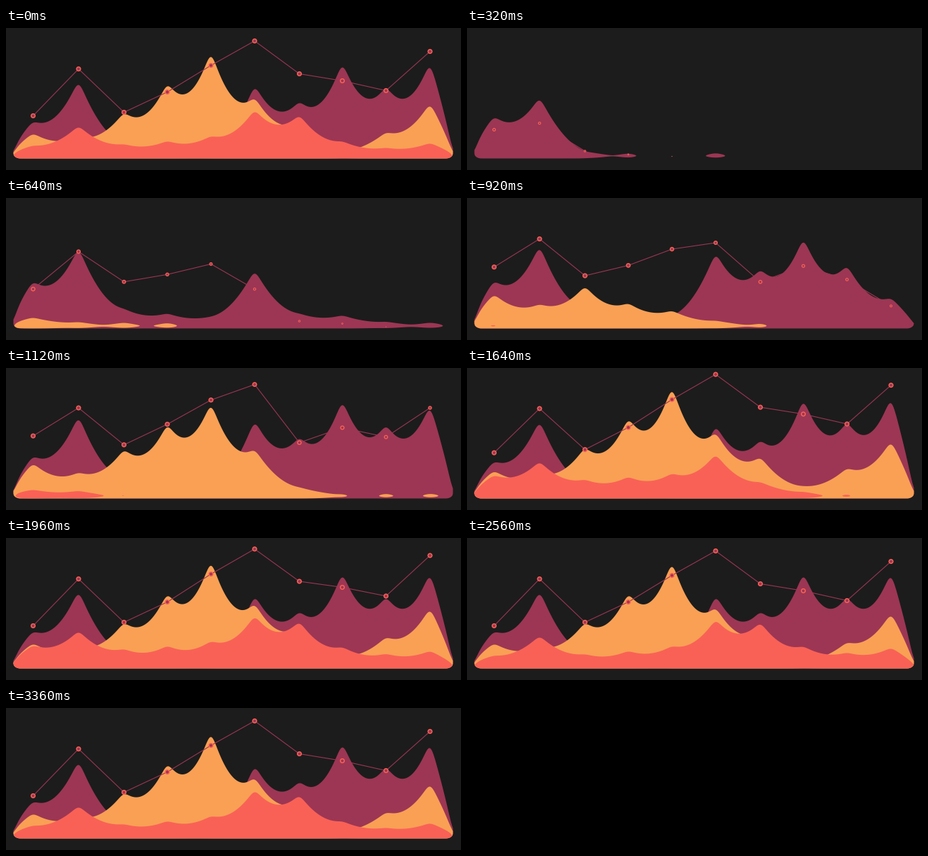
Animation, 646 px wide and 203 px high, one loop 4360 ms. Source, as a matplotlib script:

```python
import numpy as np
import matplotlib.pyplot as plt
from matplotlib.animation import FuncAnimation
from matplotlib.collections import LineCollection
from matplotlib.patches import Circle, Polygon

W, H, DPI = 646, 203, 100
STEP, LOOP = 40, 4360
STAGGER, WAVE = 80, 480
FLOOR = 186.5
LEFT, RIGHT = 10.5, 634.5
BASE, THIN = 7, 7.6
BG, PLUM, AMBER, CORAL = "#1c1c1c", "#9c3654", "#f9a055", "#f96156"
PX = 72 / DPI

KX = np.array([38.5, 103, 167.5, 229, 291, 353, 416.5, 477.5, 539.5, 602])
IDX = np.arange(len(KX))
LAYERS = [
    (PLUM, np.array([51, 105, 22, 15, 12, 99, 79, 130, 99, 129])),
    (AMBER, np.array([34, 30, 63, 103, 145, 84, 50, 11, 36, 74])),
    (CORAL, np.array([18, 44, 20, 24, 31, 66, 59, 24, 15, 21])),
]
# heights of the line chart after each of its three waves
LINE_A = np.array([50, 112, 70, 85, 112, 125, 70, 103, 92, 143])
LINE_B = np.array([90, 130, 77, 108, 146, 179, 131, 121, 107, 163])
LINE_C = np.array([61, 128, 66, 95, 133, 168, 121, 111, 97, 153])

X = np.arange(LEFT, RIGHT + 0.25, 0.5)
KERNEL = np.exp(-0.5 * (np.arange(-24, 25) / 8) ** 2)
KERNEL /= KERNEL.sum()


def rise(t):
    return np.interp(
        t,
        [-120, -80, 0, 40, 120, 160, 200, 220, 240, 280, 360, 440, 520, 600, 680, 760],
        [0, .015, .03, .05, .12, .18, .27, .45, .72, .8, .89, .945, .963, .98, .99, 1])


def settle(t):
    return np.interp(t, [960, 1040, 1080, 1120, 1160, 1210],
                     [1, .95, .75, .5, .25, 0])


def line_settle(t):
    return np.interp(t, [1160, 1240, 1320, 1400, 1480, 1560, 1640, 1720],
                     [1, .85, .65, .5, .35, .25, .15, 0])


def dip_curve(v):
    """Sagging arcs between the peaks, falling off to both ends."""
    k = np.clip(np.searchsorted(KX, X) - 1, 0, len(KX) - 2)
    u = (X - KX[k]) / (KX[k + 1] - KX[k])
    a, b = v[k], v[k + 1]
    c = 0.42 * (a + b) / 2 + 2
    h = (1 - u) ** 2 * a + 2 * u * (1 - u) * c + u ** 2 * b
    lo, hi = X < KX[0], X > KX[-1]
    h[lo] = 6 + (v[0] - 6) * ((X[lo] - LEFT) / (KX[0] - LEFT)) ** 0.65
    h[hi] = 6 + (v[-1] - 6) * ((RIGHT - X[hi]) / (RIGHT - KX[-1])) ** 0.85
    return h


def smooth(h):
    return np.convolve(np.pad(h, 24, mode="edge"), KERNEL, mode="valid")


def profile(v):
    """Rounded curve whose peaks still reach the heights v."""
    tips = v.astype(float)
    for _ in range(3):
        h = smooth(dip_curve(tips))
        tips = tips + v - np.interp(KX, X, h)
    return smooth(dip_curve(tips))


def outline(v):
    h = np.maximum(profile(v), 0.1)
    half = h / 2 * np.sqrt(np.clip(1 - (THIN / h) ** 6, 0, 1))
    mid = FLOOR - h / 2
    edge = np.clip(1 - np.minimum(X - LEFT, RIGHT - X) / 10, 0, 1)
    corner = FLOOR - 7 * (1 - np.sqrt(1 - edge ** 2))
    top = mid - half
    bottom = np.maximum(np.minimum(mid + half, corner), top)
    return np.column_stack([np.r_[X, X[::-1]], np.r_[top, bottom[::-1]]])


def layer_heights(v, t):
    f = rise(t)
    base = np.full(len(v), float(BASE))
    base[0] += 7 * min(1, 1.5 * f[0])
    return v * f + base * settle(t)


# the tiny margin keeps the pixel size from rounding down
fig = plt.figure(figsize=((W + 0.01) / DPI, (H + 0.01) / DPI), dpi=DPI, facecolor=BG)
ax = fig.add_axes([0, 0, 1, 1])
ax.set_xlim(0, W)
ax.set_ylim(H, 0)
ax.axis("off")

areas = []
for z, (color, _) in enumerate(LAYERS):
    area = Polygon([(0, 0), (0, 0), (0, 0)], closed=True, fc=color, lw=0, zorder=z)
    areas.append(ax.add_patch(area))
links = LineCollection([], colors=PLUM, zorder=4)
ax.add_collection(links, autolim=False)
dots = [ax.add_patch(Circle((x, 0), 1, fc=PLUM, ec=CORAL, zorder=5)) for x in KX]


def draw(frame):
    now = frame * STEP if frame else LOOP
    t = now - STAGGER * IDX
    for n, (area, (_, v)) in enumerate(zip(areas, LAYERS)):
        area.set_xy(outline(layer_heights(v, t - n * WAVE)))

    y = FLOOR - (LINE_A * rise(t - 20) + (LINE_B - LINE_A) * rise(t - WAVE)
                 + (LINE_C - LINE_B) * (1 - line_settle(t)))
    pts = np.column_stack([KX, y])
    links.set_segments(np.stack([pts[:-1], pts[1:]], axis=1))
    links.set_linewidths(1.1 * PX * np.clip((t[1:] - 80) / 80, 0, 1))

    radii = np.interp(t, [-40, 80, 280, 440, 760], [0, .9, 1.8, 2.2, 2.8])
    for dot, x, yy, r in zip(dots, KX, y, radii):
        dot.center = x, yy
        dot.set_radius(r)
        dot.set_linewidth((0.5 + 0.36 * r) * PX)
        dot.set_visible(r > 0)
    return [*areas, links, *dots]


anim = FuncAnimation(fig, draw, frames=LOOP // STEP, interval=STEP,
                     repeat=True, repeat_delay=0, blit=False)
plt.show()
```
